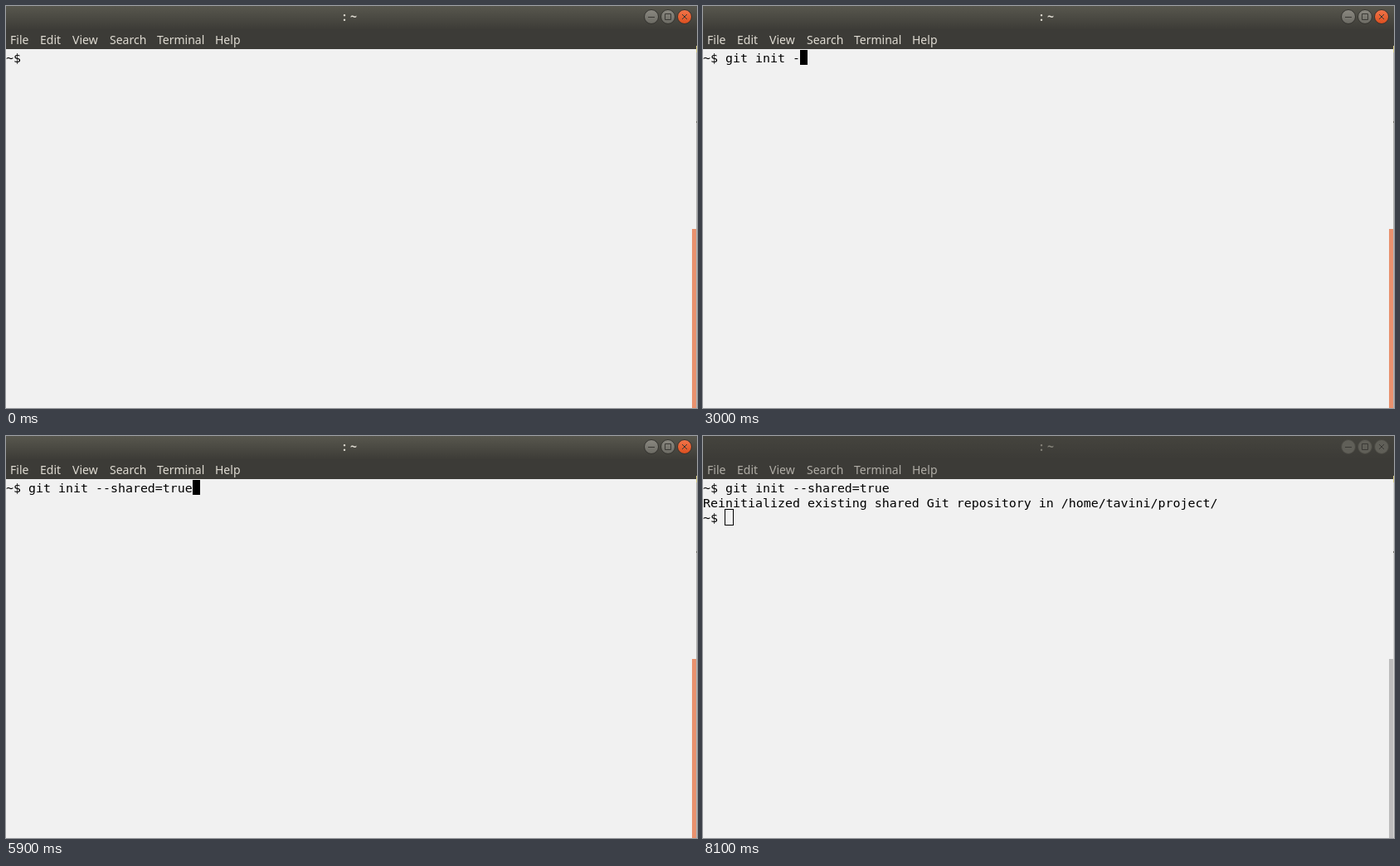
Recreate the animation shown at these times as an HTML page. Size 833 px wide and 485 px high, loop 8.2 s.

```html
<!DOCTYPE html>
<html lang="en">
<head>
<meta charset="utf-8">
<title>Terminal</title>
<style>
html, body { margin: 0; width: 100%; height: 100%; overflow: hidden; background: #f1f1f1; }
svg { display: block; }
text { white-space: pre; }
.term { font: 14.95px "DejaVu Sans Mono", monospace; fill: #000; }
.menu { font: 14px "Noto Sans", "Open Sans", sans-serif; fill: #dfdbd2; }
.title { font: bold 14px "Noto Sans", "Open Sans", sans-serif; fill: #dfdbd2; }
.bar { fill: url(#bar); }
.button { fill: url(#grey); stroke: #33322e; }
.close { fill: url(#orange); }
.sign { fill: none; stroke: #3a3935; }
.scroll { fill: #e9916e; }
.edge { fill: #b4b4b2; }
.idle .menu { fill: #b0ada6; }
.idle .title { fill: #858279; }
.idle .bar { fill: url(#idleBar); }
.idle .button { fill: #605f58; stroke: #494842; }
.idle .scroll { fill: #bdbdbd; }
.idle .edge { fill: #d6d6d4; }
</style>
</head>
<body>
<svg id="stage" width="833" height="485" viewBox="0 0 833 485">
  <defs>
    <linearGradient id="bar" x2="0" y2="1">
      <stop stop-color="#58574e"/><stop offset="1" stop-color="#3d3c37"/>
    </linearGradient>
    <linearGradient id="idleBar" x2="0" y2="1">
      <stop stop-color="#45443e"/><stop offset="1" stop-color="#3c3b37"/>
    </linearGradient>
    <linearGradient id="grey" x2="0" y2="1">
      <stop stop-color="#8b8981"/><stop offset="1" stop-color="#6b6a63"/>
    </linearGradient>
    <linearGradient id="orange" x2="0" y2="1">
      <stop stop-color="#f1754a"/><stop offset="1" stop-color="#dc4f1f"/>
    </linearGradient>
  </defs>
  <rect width="833" height="485" fill="#f1f1f1"/>
  <rect width="833" height="52" fill="#3c3b37"/>
  <rect class="bar" width="833" height="28"/>
  <text class="title" x="406" y="18">:</text>
  <text class="title" x="415" y="18">~</text>
  <g class="menu">
    <text x="5" y="46">File</text>
    <text x="41" y="46">Edit</text>
    <text x="80" y="46">View</text>
    <text x="125" y="46">Search</text>
    <text x="182" y="46">Terminal</text>
    <text x="252" y="46">Help</text>
  </g>
  <circle class="button" cx="778" cy="13" r="8.5"/>
  <circle class="button" cx="798" cy="13" r="8.5"/>
  <circle class="button close" cx="818" cy="13" r="8.5"/>
  <path class="sign" d="M774 13.5h8M794.5 9.5h7v7h-7zM815 10l6 6m0-6l-6 6"/>
  <rect class="edge" x="832" y="52" width="1" height="433"/>
  <path d="M832.5 48v8" stroke="#d9cf86"/>
  <path d="M832.5 139v2" stroke="#77766f"/>
  <rect class="scroll" x="827" y="269" width="5" height="216"/>
  <g class="term">
    <text id="command" y="68"></text>
    <text id="reply" y="86"></text>
    <text id="prompt" y="104"></text>
  </g>
  <rect id="cursor"/>
</svg>
<script>
const LOOP = 8200, ENTER = 6200, BLUR = 8100, CELL = 9;
const COMMAND = "git init --shared=true";
const REPLY = "Reinitialized existing shared Git repository in /home/tavini/project/";
// time at which each character of the command appears
const KEYS = [600, 600, 800, 1100, 1600, 1800, 2100, 2200, 2300, 3000, 3200,
  3400, 3600, 3700, 4000, 4200, 4400, 5000, 5300, 5600, 5800, 5900];

const byId = id => document.getElementById(id);
const stage = byId("stage"), cursor = byId("cursor");

function setCursor(x, y, w, h, fill, stroke) {
  Object.entries({ x, y, width: w, height: h, fill, stroke })
    .forEach(([name, value]) => cursor.setAttribute(name, value));
}

function draw(t) {
  const typed = KEYS.filter(k => k <= t).length;
  const done = t >= ENTER, idle = t >= BLUR;
  const hidden = t < 300 || (t >= 6900 && t < 7500);

  byId("command").textContent = "~$ " + COMMAND.slice(0, typed);
  byId("reply").textContent = done ? REPLY : "";
  byId("prompt").textContent = done ? "~$ " : "";
  stage.classList.toggle("idle", idle);

  const x = CELL * (3 + (done ? 0 : typed)), y = done ? 89 : 53;
  if (idle) setCursor(x - 0.5, y - 0.5, 10, 19, "none", "#000");
  else setCursor(x, y, CELL, 18, hidden ? "none" : "#000", "none");
}

const start = performance.now();
function tick(now) {
  draw(Math.max(0, now - start) % LOOP);
  requestAnimationFrame(tick);
}
draw(0);
requestAnimationFrame(tick);
</script>
</body>
</html>
```
